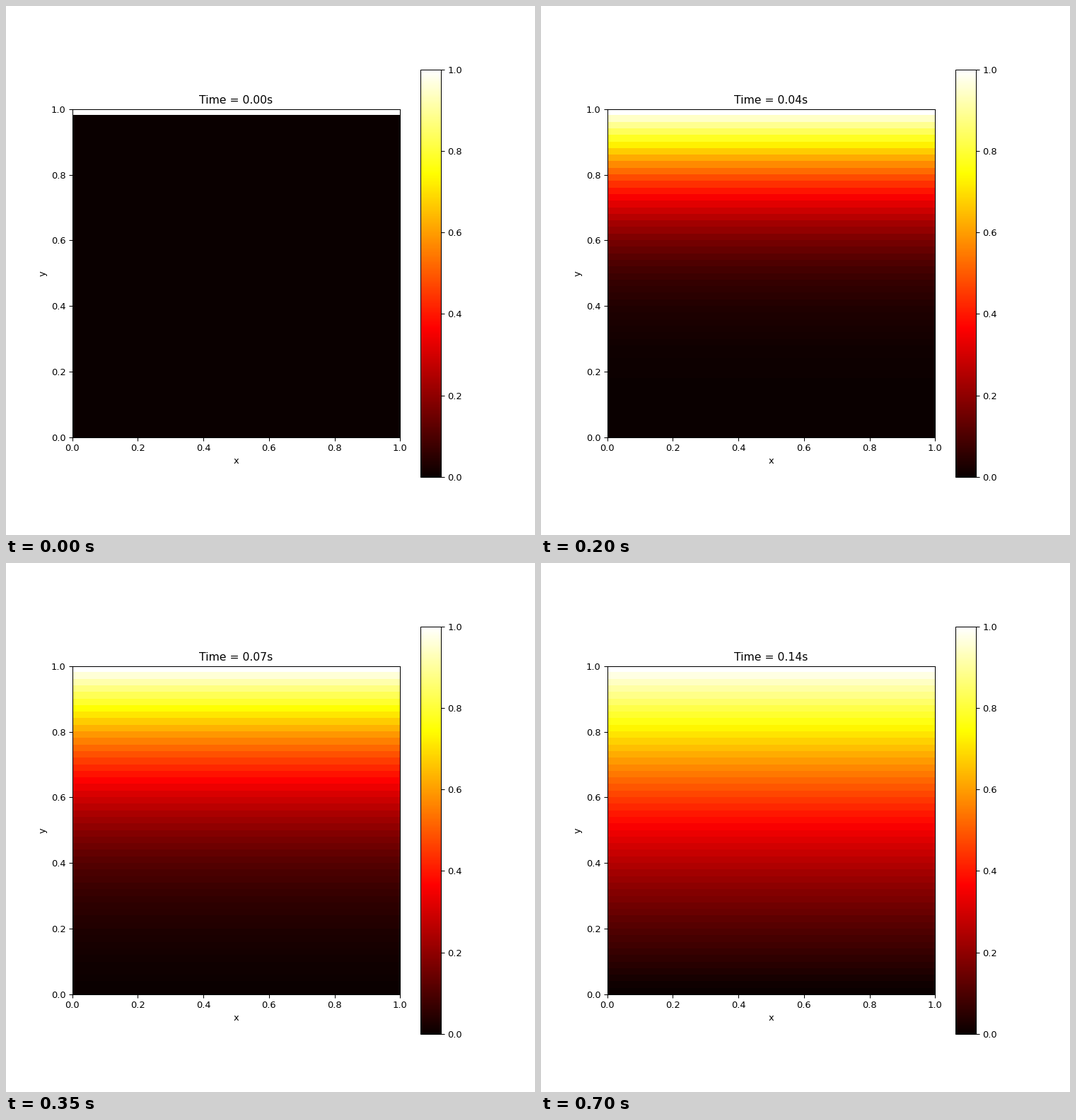
These frames come from a looping animation (748x748 px, 0.75 s). A matplotlib script:

```python
import numpy as np
import matplotlib.pyplot as plt
from matplotlib.animation import FuncAnimation

SIZE, INCHES = 748, 8
NODES = 50
FRAMES, INTERVAL = 15, 50
DX = 1 / NODES
DT, STEPS = DX ** 2 / 4, 100  # stable solver step, steps per frame
TOP = 1.002  # the grid reaches one pixel past the upper edge


def solve():
    """Heat equation in y: hot top edge, cold bottom edge, insulated sides."""
    ratio = DT / DX ** 2
    u = np.zeros(NODES)
    u[-1] = 1
    history = [u.copy()]
    for _ in range(FRAMES - 1):
        for _ in range(STEPS):
            u[1:-1] += ratio * (u[2:] - 2 * u[1:-1] + u[:-2])
        history.append(u.copy())
    return history


def field(column):
    return np.tile(column[:, None], (1, NODES))


profiles = solve()

fig, ax = plt.subplots(figsize=(INCHES, INCHES), dpi=SIZE / INCHES)
image = ax.imshow(field(profiles[0]), cmap="hot", origin="lower",
                  extent=[0, 1, 0, TOP], vmin=0, vmax=1)
ax.set(xlim=(0, 1), ylim=(0, 1), xlabel="x", ylabel="y")
fig.colorbar(image, ax=ax)
title = ax.set_title("Time = 0.00s")


def update(frame):
    image.set_data(field(profiles[frame]))
    title.set_text(f"Time = {frame * STEPS * DT:.2f}s")
    return image, title


anim = FuncAnimation(fig, update, frames=FRAMES, interval=INTERVAL,
                     repeat=True, repeat_delay=0, blit=False)
plt.show()
```
